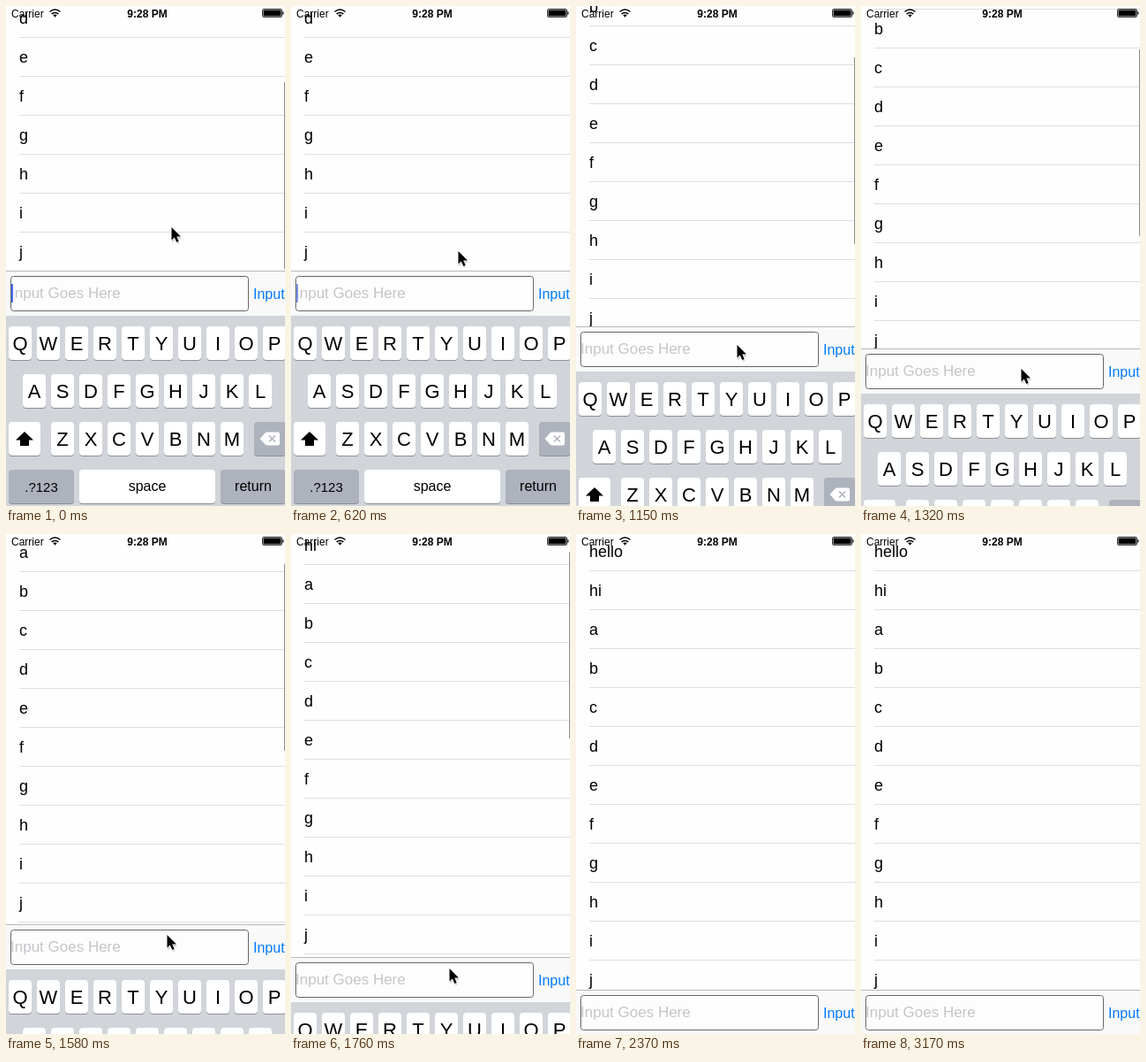
An HTML page that plays this animation: 316 px wide and 565 px high, repeating every 3.64 s.

```html
<!DOCTYPE html>
<html lang="en">
<head>
<meta charset="utf-8">
<title>Drag to dismiss keyboard</title>
<style>
  html, body { margin: 0; width: 100%; height: 100%; overflow: hidden; background: #fefefe; }
  svg { display: block; width: 100%; height: 100%; }
  text { font-family: "Liberation Sans", Arial, Helvetica, sans-serif; font-size: 18px; }
  .letter { font-size: 22px; text-anchor: middle; }
  .word { font-size: 16px; text-anchor: middle; }
  .status { font-size: 12px; }
</style>
</head>
<body>
<svg id="stage" viewBox="0 0 316 565"></svg>
<script>
const LOOP = 3640, DRAG_START = 610, STEP = 87.5;
const ROW_HEIGHT = 44, BAR_TOP = 299, LIST_REST = 226;
const ROWS = ["hello", "hi", ..."abcdefghij"];

// Keyframes are [step, value]; steps count from the start of the drag.
const BAR_SHIFT = [[1.5, 0], [4, 38], [8, 88], [11, 142], [15, 216]];
const LIST_SHIFT = [[1, 0], [4, 50], [8, 100], [11, 139], [16, 230], [20, LIST_REST]];
const CURSOR_X = [[-7, 187], [-4, 189], [0, 189], [4, 182], [8, 181], [11, 182], [16, 175]];
const CURSOR_Y = [[-7, 250], [-4, 277], [0, 277], [4, 355], [8, 410], [11, 453], [16, 548], [17, 572]];
const SCROLLER = [[-7, 1], [-4, 0], [0, 0], [2, 1], [17, 1], [20, 0]];
const CARET = [[-7, 1], [0, 0.65], [2, 0]];

const rect = (x, y, w, h, fill, extra = "") =>
  `<rect x="${x}" y="${y}" width="${w}" height="${h}" fill="${fill}" ${extra}/>`;
const text = (x, y, label, extra = "") => `<text x="${x}" y="${y}" ${extra}>${label}</text>`;

const key = (x, y, w, fill = "#fff") =>
  rect(x, y + 1, w, 38, "#8b8e93", 'rx="4"') + rect(x, y, w, 38, fill, 'rx="4"');
const letterRow = (letters, x, y) => [...letters].map((letter, i) =>
  key(x + 32 * i, y, 26) + text(x + 32 * i + 13, y + 27, letter, 'class="letter"')).join("");

function listMarkup() {
  return ROWS.map((label, i) => {
    const line = BAR_TOP - ROW_HEIGHT * (ROWS.length - 1 - i);
    return `<g class="row">${text(15, line - 15, label)}${rect(15, line, 301, 1, "#dedee0")}</g>`;
  }).join("");
}

function barMarkup() {
  return rect(0, BAR_TOP, 316, 51, "#f9f9f9") + rect(0, BAR_TOP, 316, 1, "#b8b8ba") +
    rect(5.5, 305.5, 269, 39, "#fdfdfd", 'rx="3" stroke="#666"') +
    text(5, 330, "Input Goes Here", 'style="font-size:17px" fill="#c5c5ca"') +
    rect(6, 314, 2, 21, "#466bf2", 'id="caret"') +
    text(280, 331, "Input", 'style="font-size:16px" fill="#007aff"');
}

function keyboardMarkup() {
  const gray = "#adb2bc";
  return rect(0, 350, 316, 215, "#d1d5da") +
    letterRow("QWERTYUIOP", 3, 362) + letterRow("ASDFGHJKL", 19, 416) + letterRow("ZXCVBNM", 51, 470) +
    key(3, 470, 36) + '<path d="M21 481l10 9.5h-5v6.5h-10v-6.5h-5z"/>' +
    key(281, 470, 36, gray) +
    '<path d="M287.5 489l6-6.5q1-1 2.500-1h12q2 0 2 2v11q0 2-2 2h-12q-1.500 0-2.500-1z" fill="#fff"/>' +
    `<path d="M298 485.500l7 7m0-7l-7 7" stroke="${gray}" stroke-width="1.500"/>` +
    key(3, 524, 74, gray) + text(40, 549, ".?123", 'class="word" style="font-size:15px"') +
    key(83, 524, 154) + text(160, 548, "space", 'class="word"') +
    key(243, 524, 74, gray) + text(280, 548, "return", 'class="word"');
}

function statusMarkup() {
  return text(6, 12.5, "Carrier", 'class="status"') +
    text(160, 12.5, "9:28 PM", 'class="status" font-weight="bold" text-anchor="middle"') +
    '<path d="M49.500 6.500q6-5 12 0M51.700 9q3.800-3 7.600 0" fill="none" stroke="#000" stroke-width="1.600"/>' +
    '<path d="M53.300 10.300q2.200-1.600 4.400 0l-2.200 2.400z"/>' +
    rect(290.5, 3.5, 22, 9, "none", 'rx="1.5" stroke="#000" stroke-width=".8"') +
    rect(291.5, 4.5, 20, 7, "#000", 'rx=".5"') + rect(313.3, 6.5, 1.2, 3, "#000");
}

const stage = document.getElementById("stage");
stage.innerHTML = rect(0, 0, 316, 565, "#fefefe") + listMarkup() +
  rect(315, 86, 1, 211, "#8c8c8c", 'id="scroller"') +
  `<g id="panel">${barMarkup()}${keyboardMarkup()}</g>` + statusMarkup() +
  `<g id="cursor"><path d="M1 2v15l3.500-3 2.500 5 2.500-1-2-5h4.500z" fill="#000" opacity=".2"/>
   <path d="M.5 0v14.500l3.300-3 2.500 5.600 2.400-1-2.400-5.500h4.700z" stroke="#fff" stroke-width="1.400" paint-order="stroke"/></g>`;

const [scroller, panel, caret, cursor] =
  ["scroller", "panel", "caret", "cursor"].map(id => document.getElementById(id));
const rows = [...stage.querySelectorAll(".row")];

function valueAt(keys, step) {
  if (step <= keys[0][0]) return keys[0][1];
  const next = keys.findIndex(([at]) => at > step);
  if (next < 0) return keys[keys.length - 1][1];
  const [a, from] = keys[next - 1], [b, to] = keys[next];
  return from + (to - from) * (step - a) / (b - a);
}

const move = (node, x, y) =>
  node.setAttribute("transform", `translate(${Math.round(x)} ${Math.round(y)})`);

function draw(now) {
  const step = Math.floor((now % LOOP - DRAG_START) / STEP);
  const shift = valueAt(LIST_SHIFT, step);
  // The top row stops at its resting place while the others overshoot.
  rows.forEach((row, i) => move(row, 0, i ? shift : Math.min(shift, LIST_REST)));
  move(panel, 0, valueAt(BAR_SHIFT, step));
  move(scroller, 0, -0.375 * shift);
  move(cursor, valueAt(CURSOR_X, step), valueAt(CURSOR_Y, step));
  scroller.setAttribute("opacity", valueAt(SCROLLER, step));
  caret.setAttribute("opacity", valueAt(CARET, step));
}

const start = performance.now();
function tick() {
  draw(performance.now() - start);
  requestAnimationFrame(tick);
}
tick();
</script>
</body>
</html>
```
